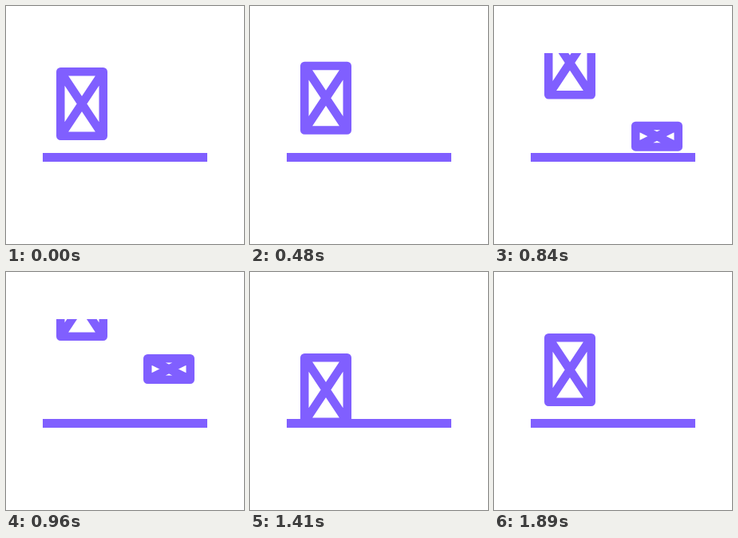
Animation of 298 by 298 pixels, one loop 2.25 s. Source, as an HTML page:

```html
<!DOCTYPE html>
<html lang="en">
<head>
<meta charset="utf-8">
<title>Crates</title>
<style>
  html, body { margin: 0; width: 100%; height: 100%; overflow: hidden; background: #fff; }
  svg { display: block; width: 100%; height: 100%; }
  path { fill: none; stroke: #805fff; stroke-width: 10.5; stroke-linejoin: round; }
</style>
</head>
<body>
<svg viewBox="0 0 298 298">
  <clipPath id="shaft"><rect x="36" y="59" width="226" height="136"/></clipPath>
  <g clip-path="url(#shaft)">
    <!-- Both crates are drawn from the middle of their top edge -->
    <path id="tall" d="M-26.75 5.25h53.5v80.5h-53.5zL26.75 85.75M26.75 5.25L-26.75 85.75"/>
    <path id="flat" d="M-26.75 5.25h53.5v26.5h-53.5zL26.75 31.75M26.75 5.25L-26.75 31.75"/>
  </g>
  <rect x="46" y="184" width="206" height="11" fill="#805fff"/>
</svg>
<script>
const LOOP = 2250, STEP = 30, TURN = 1050, END = 2043, POWER = 3.5;
const tall = document.getElementById('tall');
const flat = document.getElementById('flat');

function place(crate, x, y, scale = 1) {
  crate.setAttribute('transform', `translate(${x} ${y}) scale(${scale})`);
}

// Leaves upwards with an ease-in, returns from below with an ease-out.
function tallOffset(t) {
  if (t < 240 || t >= 1890) return 0;
  return t < TURN
    ? -82 * (t / 960) ** POWER
    : 77 * ((END - t) / (END - 1170)) ** POWER;
}

// Rises through the shaft, slowing slightly.
function flatTop(t) {
  if (t < 600 || t > 1320) return 300;
  const d = t - 960;
  return 103 - 0.33 * d + 0.000143 * d * d;
}

function draw(now) {
  const t = Math.floor(now % LOOP / STEP) * STEP;
  const offset = tallOffset(t);
  place(tall, 95, 77 + offset, 1 - Math.max(0, offset - 45) * 0.0025);
  place(flat, 204, flatTop(t));
}

const start = performance.now();
function tick() {
  draw(performance.now() - start);
  requestAnimationFrame(tick);
}
tick();
</script>
</body>
</html>
```
